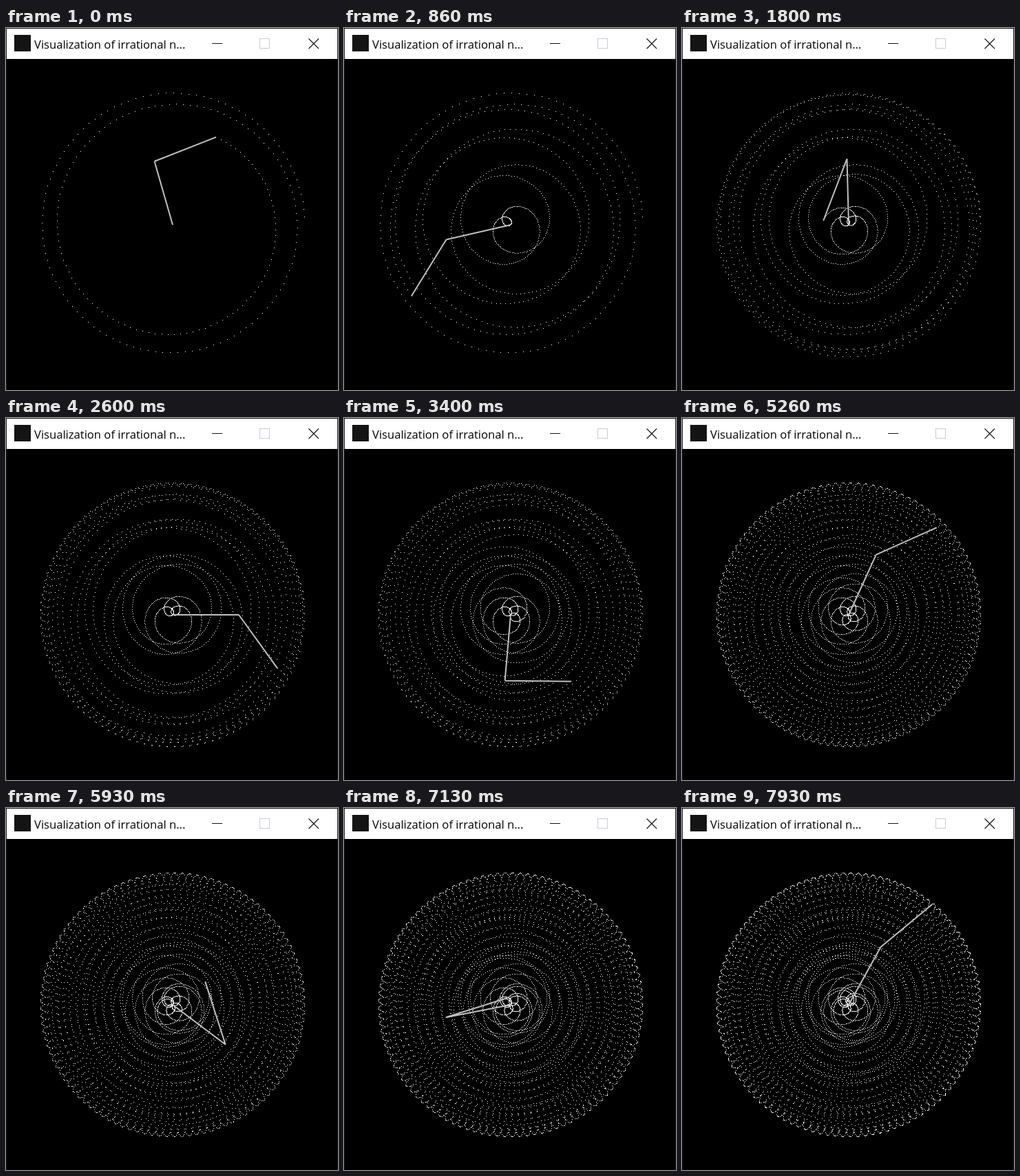
These frames come from a looping animation (482x526 px, 8 s). An HTML page with a canvas:

```html
<!DOCTYPE html>
<html lang="en">
<head>
<meta charset="utf-8">
<title>Visualization of irrational numbers</title>
<style>
  html, body { margin: 0; width: 100%; height: 100%; overflow: hidden; background: #000; }
  canvas, svg { position: absolute; left: 0; top: 0; display: block; }
  text { font: 16.6px "Open Sans", "Noto Sans", sans-serif; fill: #000; }
</style>
</head>
<body>
<canvas id="stage" width="482" height="526"></canvas>
<svg width="482" height="526" fill="none">
  <path d="M.5 526V.5H481.5V526" stroke="#1c1c1c"/>
  <rect x="1" y="1" width="480" height="44" fill="#fff"/>
  <rect x="12" y="10" width="24" height="24" fill="#141414"/>
  <text x="41" y="30">Visualization of irrational n...</text>
  <path d="M299 22.5H314" stroke="#111"/>
  <rect x="368.5" y="15.5" width="14" height="14" stroke="#cbcbdb"/>
  <path d="M439.5 15.5L454 30M454 15.5L439.5 30" stroke="#111" stroke-width="1.1"/>
</svg>
<script>
const LOOP = 8000;
const CENTER = { x: 242, y: 286 };
const ARM = 96;
const INNER_STEP = 3.5;      // degrees per dot
const OUTER_STEP = Math.PI;  // degrees per dot

// [tick, dots drawn]: the pace wavers slightly around 49 dots per tick
const PACE = [[0, 236], [27, 1569], [51, 2750], [69, 3648], [89, 4618], [107, 5506], [119, 6086]];

const ctx = document.getElementById('stage').getContext('2d');

function extend(from, degrees) {
  const angle = degrees * Math.PI / 180;
  return { x: from.x + ARM * Math.cos(angle), y: from.y - ARM * Math.sin(angle) };
}

function pose(n) {
  const elbow = extend(CENTER, n * INNER_STEP);
  return { elbow, tip: extend(elbow, n * OUTER_STEP) };
}

// 15 ticks per second, with tick times cut to whole hundredths
function tickAt(ms) {
  return Math.ceil((Math.floor(ms / 10) + 1) * 3 / 20) - 1;
}

function dotsAt(tick) {
  const i = Math.max(1, PACE.findIndex(([end]) => tick <= end));
  const [t0, n0] = PACE[i - 1];
  const [t1, n1] = PACE[i];
  return Math.round(n0 + (n1 - n0) * (tick - t0) / (t1 - t0));
}

function draw(count) {
  ctx.fillStyle = '#000';
  ctx.fillRect(0, 0, 482, 526);

  ctx.fillStyle = '#fff';
  for (let n = 1; n <= count; n++) {
    const { tip } = pose(n);
    ctx.fillRect(Math.floor(tip.x), Math.floor(tip.y), 1, 1);
  }

  const { elbow, tip } = pose(count);
  ctx.strokeStyle = '#c0c0c0';
  ctx.lineWidth = 2;
  ctx.beginPath();
  ctx.moveTo(CENTER.x, CENTER.y);
  ctx.lineTo(elbow.x, elbow.y);
  ctx.moveTo(elbow.x, elbow.y);
  ctx.lineTo(tip.x, tip.y);
  ctx.stroke();
}

const start = performance.now();
let shown = -1;

function frame() {
  const tick = tickAt((performance.now() - start) % LOOP);
  if (tick !== shown) {
    shown = tick;
    draw(dotsAt(tick));
  }
  requestAnimationFrame(frame);
}
frame();
</script>
</body>
</html>
```
